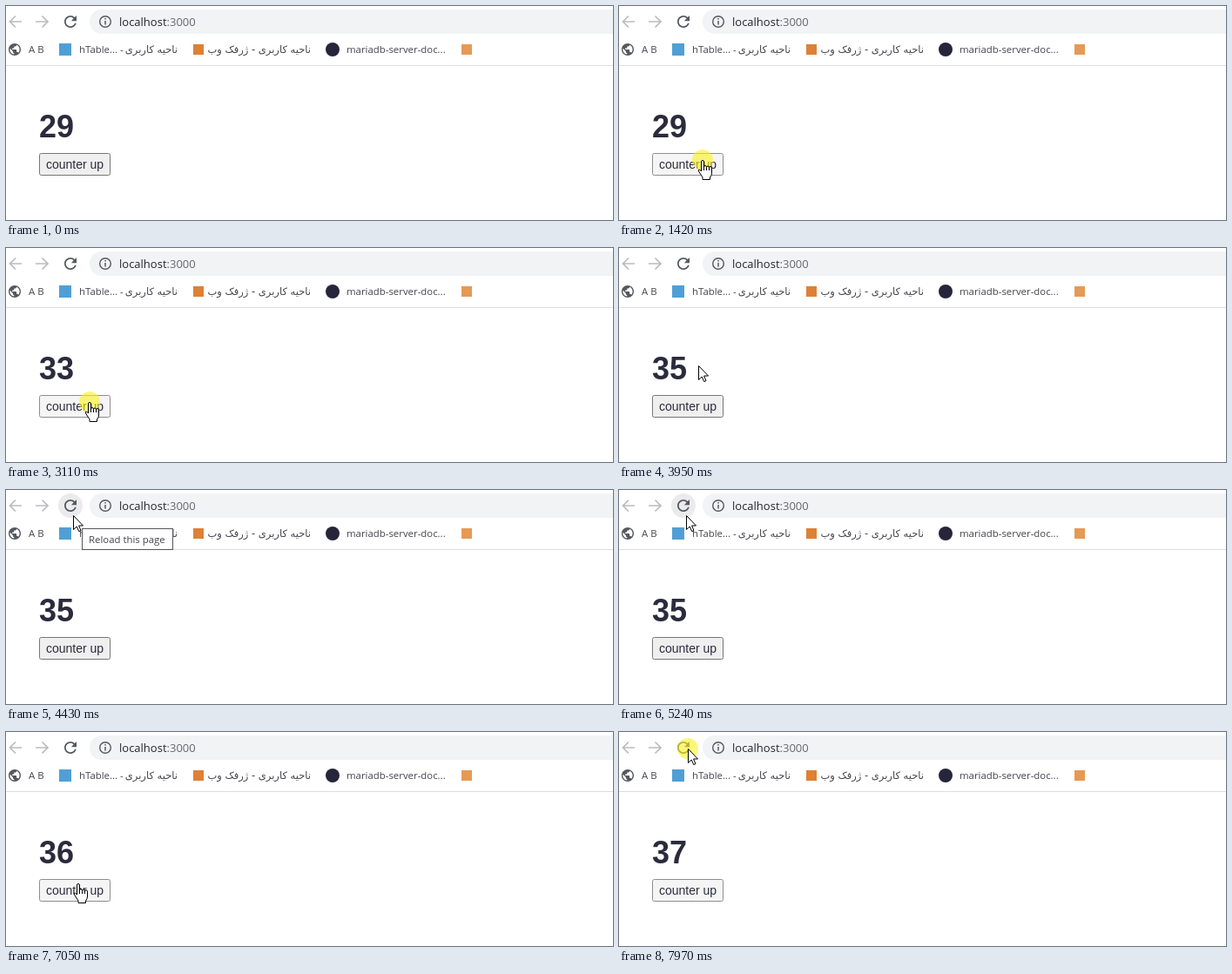
Write an HTML page that moves like this. It is 697x246 px and loops after 8 s.

```html
<!DOCTYPE html>
<html lang="en">
<meta charset="utf-8">
<title>Counter</title>
<style>
  html, body { margin: 0; width: 100%; height: 100%; overflow: hidden; background: #fff; }
  svg { display: block; width: 100vw; height: 100vh; }
  text { font-family: "Open Sans", "Noto Sans", sans-serif; font-size: 11.4px; fill: #45454f; white-space: pre; }
  .url { font-size: 13px; fill: #26262e; }
  .url tspan { fill: #66696f; }
  .fa { font-family: "DejaVu Sans", sans-serif; font-size: 11.5px; direction: rtl; }
  .page { font-family: "Liberation Sans", Arial, sans-serif; fill: #2c2b3d; }
  #count { font-size: 36px; font-weight: bold; }
  .label { font-size: 14px; }
  .icon { fill: #55585f; }
  .nav { fill: none; stroke: #babcc0; stroke-width: 1.7; }
  .cursor { fill: #fff; stroke: #000; stroke-width: 1; stroke-linejoin: round; }
</style>
<svg viewBox="0 0 697 246">
  <!-- toolbar -->
  <path class="nav" d="M18 18H5M11 11.5L4.500 18L11 24.500M34 18H48M41.500 11.500L48 18L41.500 24.500"/>
  <circle id="halo" cx="74" cy="18" r="14" fill="#ebebee"/>
  <path class="icon" transform="translate(63.500 7.500) scale(.875)" d="M17.650 6.350C16.200 4.900 14.210 4 12 4c-4.420 0-7.990 3.580-7.990 8s3.570 8 7.990 8c3.730 0 6.840-2.550 7.730-6h-2.080c-.820 2.330-3.040 4-5.650 4-3.310 0-6-2.690-6-6s2.690-6 6-6c1.660 0 3.140.690 4.220 1.780L13 11h7V4l-2.350 2.350z"/>
  <rect x="96" y="4" width="640" height="28" rx="14" fill="#f1f3f4"/>
  <circle cx="114" cy="18" r="6.300" fill="none" stroke="#55585f" stroke-width="1.400"/>
  <path d="M114 17v4.500M114 14v1.600" stroke="#55585f" stroke-width="1.500"/>
  <text class="url" x="130" y="23">localhost<tspan>:3000</tspan></text>

  <!-- bookmarks -->
  <path class="icon" transform="translate(1.600 41.600) scale(.7)" d="M12 2C6.480 2 2 6.480 2 12s4.480 10 10 10 10-4.480 10-10S17.520 2 12 2zm-1 17.930c-3.950-.490-7-3.850-7-7.930 0-.620.080-1.210.210-1.790L9 15v1c0 1.100.900 2 2 2v1.930zm6.900-2.540c-.260-.810-1-1.390-1.900-1.390h-1v-3c0-.550-.450-1-1-1H8v-2h2c.550 0 1-.450 1-1V7h2c1.100 0 2-.900 2-2v-.410c2.930 1.190 5 4.060 5 7.410 0 2.080-.800 3.970-2.100 5.390z"/>
  <text x="26" y="54">A B</text>
  <rect x="61" y="43" width="14" height="14" fill="#4f9fd6"/>
  <text x="84" y="54">hTable... -</text>
  <text class="fa" x="197" y="54">ناحیه کاربری</text>
  <rect x="215" y="44" width="12" height="12" fill="#dd8136"/>
  <text class="fa" x="350" y="54">ناحیه کاربری - ژرفک وب</text>
  <circle cx="375" cy="50" r="8" fill="#26253a"/>
  <text x="391" y="54">mariadb-server-doc...</text>
  <rect x="523" y="44" width="12" height="12" fill="#e59a55"/>
  <path d="M0 68.500H697" stroke="#dcdde0"/>

  <!-- page -->
  <text id="count" class="page" x="38" y="151">29</text>
  <rect id="button" x="38.500" y="169.500" width="81" height="25" rx="2"/>
  <text class="page label" x="46" y="187">counter up</text>

  <g id="tip">
    <rect x="87.500" y="44.500" width="104" height="24" fill="#fff" stroke="#55555c"/>
    <text x="95" y="61">Reload this page</text>
  </g>
  <g id="pointer">
    <circle id="spot" r="12" fill="#fcf11e" fill-opacity=".6"/>
    <path id="arrow" class="cursor" d="M.5.5V16.500L4.200 13L6.700 18.600L9 17.600L6.600 12H11.500Z"/>
    <g id="hand" class="cursor">
      <path d="M-1.500 13V2Q-1.500.5 0 .5T1.500 2V8Q1.500 6.500 3 6.500T4.500 8.500Q4.500 7 6 7T7.500 9Q7.500 7.500 9 7.500T10.500 10V15Q10.500 18 8.500 20V22.500H0V20L-4.500 13Q-5.500 10.500-3.500 11Z"/>
      <path d="M1.500 8v4M4.500 8.500v3.500M7.500 9v3"/>
    </g>
  </g>
</svg>
<script>
const LOOP = 8000, STEP = 80;
const $ = id => document.getElementById(id);
const show = (id, on) => $(id).style.display = on ? "" : "none";

// [start, steps, x, y]: the pointer advances one step every 80 ms
const moves = [
  [250, 2, 189, 187], [580, 3, 96, 177], [3870, 7, 77, 29],
  [5480, 6, 85, 167], [6220, 1, 83, 170], [6300, 2, 83, 174], [7650, 5, 79, 19]
];
// [down, up, highlight delay]
const clicks = [
  [1420, 1590], [1840, 2010], [2340, 2510], [2760, 2840], [3110, 3280],
  [3530, 3700], [6630, 6800], [7050, 7230, 80], [7480, LOOP]
];
const reloads = [[4510, 4670], [5000, 5240]];
const looks = {
  idle: ["#efefef", "#767676"],
  hover: ["#e5e5e5", "#4f4f4f"],
  pressed: ["#f5f5f5", "#8d8d8d"]
};

function pointerAt(t) {
  let x = 397, y = 179;
  for (const [start, steps, toX, toY] of moves) {
    if (t < start) break;
    const k = Math.min(1, (Math.floor((t - start) / STEP) + 1) / steps);
    x += (toX - x) * k;
    y += (toY - y) * k;
  }
  return [Math.round(x), Math.round(y)];
}

function draw(t) {
  const [x, y] = pointerAt(t);
  const over = x >= 38 && x < 120 && y >= 169 && y < 195;
  const held = ([down, up]) => t >= down && t < up;
  const lit = ([down, up, delay = 0]) => held([down + delay, up]);
  const look = clicks.some(held) ? "pressed" : over ? "hover" : "idle";

  $("count").textContent = 29 + clicks.filter(c => t >= c[1]).length;
  $("button").setAttribute("fill", looks[look][0]);
  $("button").setAttribute("stroke", looks[look][1]);
  $("pointer").setAttribute("transform", `translate(${x} ${y})`);
  show("pointer", t >= 250);
  show("spot", [...clicks, ...reloads].some(lit));
  show("hand", over);
  show("arrow", !over);
  show("halo", t >= 4350 && t < 5480);
  show("tip", t >= 4430 && t < 4510);
}

function frame() {
  draw(performance.now() % LOOP);
  requestAnimationFrame(frame);
}
frame();
</script>
</html>
```
